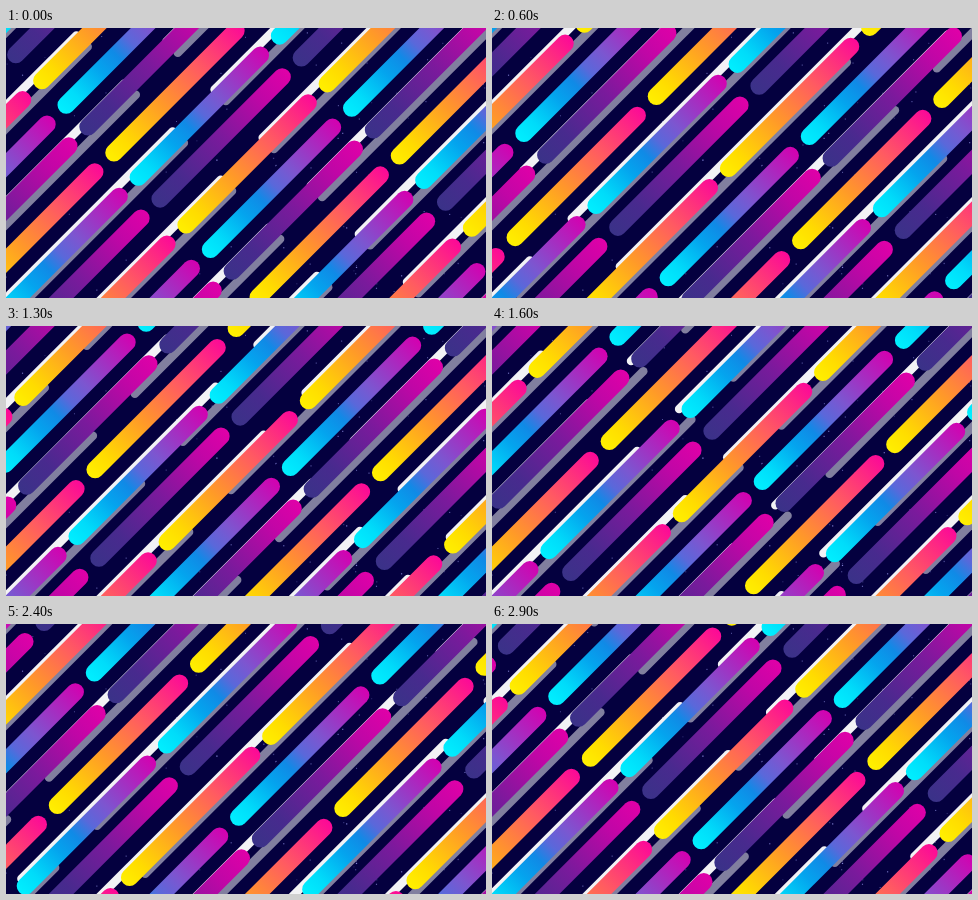
An HTML page with a canvas for the animation above (3000 ms loop, 480 px wide and 270 px high).

```html
<!DOCTYPE html>
<html lang="en">
<head>
<meta charset="utf-8">
<title>Diagonal bars</title>
<style>
  html, body { margin: 0; width: 100%; height: 100%; overflow: hidden; background: #04003f; }
  canvas { display: block; width: 480px; height: 270px; }
</style>
</head>
<body>
<canvas id="stage" width="480" height="270"></canvas>
<script>
const ctx = document.getElementById('stage').getContext('2d');
const LOOP = 3000, STEP = 100;

// Diagonal axes: u runs up-right along the bars, v runs down-right across them.
const BAR = { period: 141.2, length: 122, width: 12.3 };
const STRIP = { period: 322, gap: 42, width: 6, start: 52.5, turns: 2 };
const ROW = 72.15;

// turns = periods travelled per loop, positive is up-right
const KINDS = [
  { v: 44.2, turns: 2, stops: [[0, '#fff000'], [.13, '#ffdc00'], [.4, '#ff9a28'], [.68, '#ff5a62'], [1, '#fc0898']] },
  { v: 68.6, turns: -1, stops: [[0, '#00f0ff'], [.12, '#00dcfa'], [.3, '#04a4ee'], [.42, '#108ae6'], [.52, '#5a68da'], [.64, '#7c56d0'], [1, '#d400b0']] },
  { v: 90.4, turns: -1, stops: [[0, '#3a3288'], [.2, '#482a8e'], [.5, '#7a1a9c'], [.8, '#c006a6'], [1, '#e000a8']] }
];

function makeStars(count) {
  let seed = 7;
  const rand = () => (seed = seed * 16807 % 2147483647) / 2147483647;
  return Array.from({ length: count }, () =>
    ({ x: rand() * 480, y: rand() * 270, size: .8 + rand() * .5, alpha: .35 + rand() * .5 }));
}
const stars = makeStars(120);

const mod = (a, n) => ((a % n) + n) % n;

function line(u, v, length, width, paint) {
  ctx.strokeStyle = paint;
  ctx.lineWidth = width;
  ctx.beginPath();
  ctx.moveTo(u, v);
  ctx.lineTo(u + length, v);
  ctx.stroke();
}

function strip(v, shift, paint) {
  const { period, gap, width, start } = STRIP;
  const first = mod(start + shift, period) - 2 * period;
  for (let u = first; u < 260; u += period) line(u + gap / 2, v, period - gap, width, paint);
}

function bars(kind, v, p) {
  const { period, length, width } = BAR;
  const first = mod(-8.4 + kind.turns * period * p, period) - 3 * period;
  for (let u = first; u < 260; u += period) {
    const fill = ctx.createLinearGradient(u - 6, 0, u + length + 6, 0);
    kind.stops.forEach(([at, color]) => fill.addColorStop(at, color));
    line(u, v, length, width, fill);
  }
}

function draw(p) {
  ctx.setTransform(1, 0, 0, 1, 0, 0);
  ctx.fillStyle = '#04003f';
  ctx.fillRect(0, 0, 480, 270);
  for (const s of stars) {
    ctx.fillStyle = `rgba(150, 150, 235, ${s.alpha})`;
    ctx.fillRect(s.x, s.y, s.size, s.size);
  }
  ctx.setTransform(1, -1, 1, 1, 0, 0);
  ctx.lineCap = 'round';
  const shift = STRIP.turns * STRIP.period * p;
  for (let n = -3; n < 18; n++) {
    const kind = KINDS[mod(n, 3)];
    if (n % 2 === 0) {
      // strips are evenly spaced, the bars over them are not quite
      const mid = KINDS[0].v + n * ROW / 3;
      strip(mid - 5.3, -shift, '#f2f2f5');
      strip(mid + 6, shift, '#817f9f');
    }
    bars(kind, kind.v + Math.floor(n / 3) * ROW, p);
  }
}

function tick() {
  const t = performance.now() % LOOP;
  draw(Math.floor(t / STEP) * STEP / LOOP);
  requestAnimationFrame(tick);
}
tick();
</script>
</body>
</html>
```
